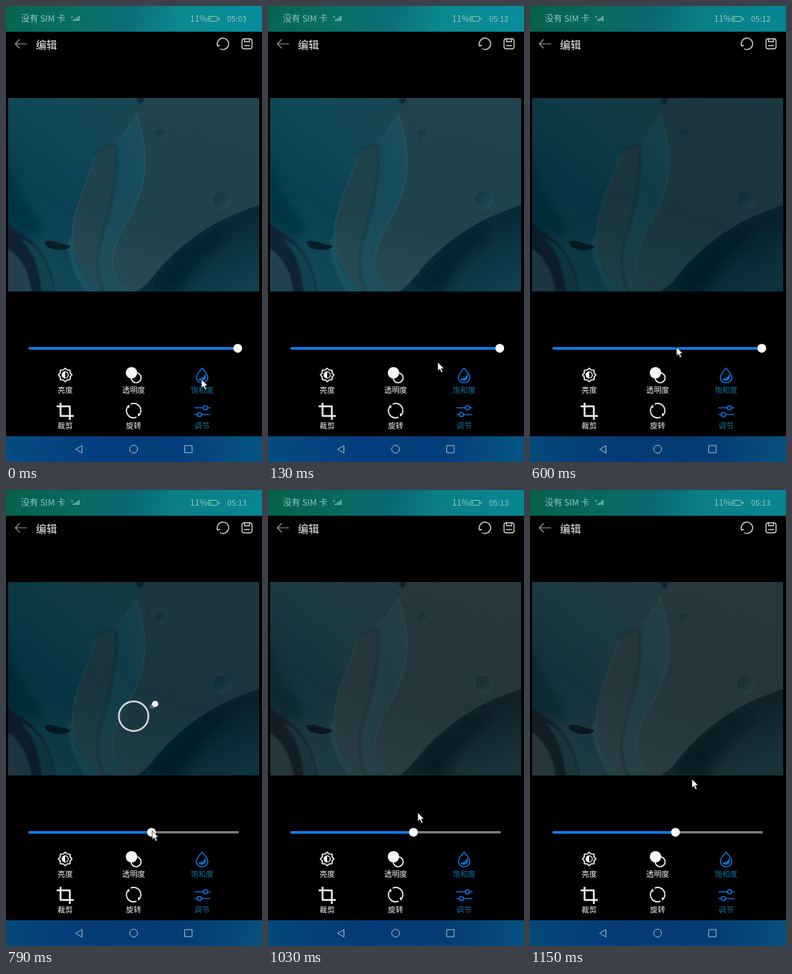
These frames come from a looping animation (359x639 px, 1270 ms). An HTML page:

```html
<!DOCTYPE html>
<html lang="zh-CN">
<head>
<meta charset="utf-8">
<title>编辑</title>
<style>
  html, body { margin: 0; width: 100%; height: 100%; overflow: hidden; background: #000; }
  svg { display: block; width: 100%; height: 100%; }
  text { font-family: "Noto Sans CJK SC", "Noto Sans CJK", "Noto Sans", sans-serif; }
  .line { fill: none; stroke: currentColor; stroke-width: 1.7; stroke-linecap: round; stroke-linejoin: round; }
  .solid { fill: currentColor; }
  .label { fill: #f2f2f2; font-size: 10.7px; text-anchor: middle; }
  .active .label { fill: #1274a4; }
  .tool { color: #f4f4f4; }
  .active { color: #0b6fd0; }

  .step { animation: 1270ms step-end infinite; }
  #cursor { animation-name: point; }
  #photo { animation-name: saturation; }
  #bars { animation-name: tint; }
  #thumb { animation-name: slide; }
  #fill { animation-name: shrink; transform-origin: 33px 480px; }
  #loader { animation-name: load; }
  #clockA { animation-name: clock-a; }
  #clockB { animation-name: clock-b; }
  #clockC { animation-name: clock-c; }

  @keyframes point {
    0% { transform: translate(274px, 523px); }
    10.236% { transform: translate(238px, 499px); }
    21.26% { transform: translate(206px, 479px); }
    47.244% { transform: translate(205.4px, 478px); }
    62.205% { transform: translate(205px, 477.5px); }
    72.441% { transform: translate(203px, 475.5px); }
    81.102% { transform: translate(210px, 452px); }
    90.551%, 100% { transform: translate(227px, 405px); }
  }
  @keyframes saturation {
    0% { filter: brightness(1.24); }
    21.26% { filter: none; }
    72.441%, 100% { filter: saturate(.62) brightness(1.05); }
  }
  @keyframes tint {
    0% { filter: brightness(1.06); }
    21.26%, 100% { filter: none; }
  }
  @keyframes slide {
    0% { transform: translateX(325px); }
    62.205%, 100% { transform: translateX(204px); }
  }
  @keyframes shrink {
    0% { transform: none; }
    62.205%, 100% { transform: scaleX(.586); }
  }
  @keyframes load {
    0%, 72.441%, 100% { visibility: hidden; }
    62.205% { visibility: visible; }
  }
  @keyframes clock-a {
    0% { visibility: visible; }
    10.236%, 100% { visibility: hidden; }
  }
  @keyframes clock-b {
    0%, 62.205%, 100% { visibility: hidden; }
    10.236% { visibility: visible; }
  }
  @keyframes clock-c {
    0% { visibility: hidden; }
    62.205%, 100% { visibility: visible; }
  }
</style>
</head>
<body>
<svg viewBox="0 0 359 639" preserveAspectRatio="none">
  <defs>
    <linearGradient id="status" gradientUnits="userSpaceOnUse" x1="0" y1="0" x2="345" y2="90"><stop stop-color="#07604c"/><stop offset=".3" stop-color="#086a60"/><stop offset=".48" stop-color="#0a6874"/><stop offset=".65" stop-color="#0a7f86"/><stop offset="1" stop-color="#078694"/></linearGradient>
    <linearGradient id="nav"><stop stop-color="#04487a"/><stop offset=".35" stop-color="#053a78"/><stop offset=".7" stop-color="#053c74"/><stop offset="1" stop-color="#06507e"/></linearGradient>
    <linearGradient id="sky" x1=".8" y1="0" x2=".4" y2="1"><stop stop-color="#1c373f"/><stop offset=".6" stop-color="#1a353d"/><stop offset="1" stop-color="#1f3c45"/></linearGradient>
    <linearGradient id="body" x1=".8" y1="0" x2=".25" y2="1"><stop stop-color="#133942"/><stop offset=".3" stop-color="#0e3a46"/><stop offset=".6" stop-color="#073443"/><stop offset="1" stop-color="#113c48"/></linearGradient>
    <linearGradient id="ribbon" x1=".8" y1="0" x2=".2" y2="1"><stop stop-color="#17404a"/><stop offset=".45" stop-color="#103c49"/><stop offset="1" stop-color="#1a404a"/></linearGradient>
    <linearGradient id="hill" x1=".2" y1=".1" x2=".8" y2="1"><stop stop-color="#0a2430"/><stop offset=".4" stop-color="#07212d"/><stop offset=".65" stop-color="#092a36"/><stop offset="1" stop-color="#0d333f"/></linearGradient>
    <linearGradient id="bubble" x2=".8" y2="1"><stop stop-color="#0f2b34"/><stop offset=".6" stop-color="#14343d"/><stop offset="1" stop-color="#1c3f48"/></linearGradient>
    <linearGradient id="tail" x1="1" y1="0" x2="0" y2="1"><stop stop-color="#fff" stop-opacity=".75"/><stop offset="1" stop-color="#fff" stop-opacity="0"/></linearGradient>
    <filter id="soft" x="-40%" y="-40%" width="180%" height="180%"><feGaussianBlur stdDeviation="7"/></filter>
    <filter id="fine"><feGaussianBlur stdDeviation="1.5"/></filter>
    <clipPath id="frame"><path d="M3 129.5H355V400H3Z"/></clipPath>
    <clipPath id="bodyClip"><path id="bodyShape" d="M3 129H194C192 140 181 148 173 165C163 188 149 194 137 198C125 204 124 218 114 243C103 270 93 298 93 319C93 351 111 383 134 401H3Z"/></clipPath>
    <clipPath id="hillClip"><path id="hillShape" d="M180 401C199 393 207 375 226 356C263 318 306 294 356 278V401Z"/></clipPath>
  </defs>

  <rect width="359" height="639"/>
  <g id="bars" class="step">
    <rect width="359" height="36" fill="url(#status)"/>
    <rect y="603" width="359" height="36" fill="url(#nav)"/>
  </g>

  <!-- Status bar -->
  <g fill="#93c4bf" color="#93c4bf">
    <text x="21" y="22" font-size="12.1" font-weight="500">没有 SIM 卡</text>
    <path d="M91 14l3 3m0-3l-3 3" stroke="currentColor" stroke-width=".8"/>
    <path d="M94 19h1.5v2H94zM96.5 17.5H98V21h-1.5zM99 16h1.5v5H99zM101.5 14H103v7h-1.5z"/>
    <text x="258" y="22" font-size="12" font-weight="500">11%</text>
    <rect class="line" style="stroke-width:1" x="283.500" y="14.500" width="13" height="7" rx="1.500"/>
    <path d="M298 16.500h1.500v3H298z"/>
    <path d="M285 16h2.500v4h-2.500z" fill="#2cd064"/>
    <g font-size="11">
      <text id="clockA" class="step" x="310" y="21.500">05:03</text>
      <text id="clockB" class="step" x="310" y="21.500">05:12</text>
      <text id="clockC" class="step" x="310" y="21.500">05:13</text>
    </g>
  </g>

  <!-- Title bar -->
  <path class="line" color="#a0a0a0" style="stroke-width:1.1" d="M29 53H13m6-6l-6 6l6 6"/>
  <text x="42" y="60" font-size="14.700" font-weight="500" fill="#f4f4f4">编辑</text>
  <g color="#d0d0d0">
    <path class="line" style="stroke-width:1.400" d="M297 56.300A8 8 0 1 1 300.500 60M295.800 53.800l1.200 2.500l2.500-1.200"/>
    <rect class="line" style="stroke-width:1.400" x="331" y="46" width="14" height="14" rx="3"/>
    <path class="line" style="stroke-width:1.300" d="M334.500 46v4h7v-4M334.500 55.500h7"/>
  </g>

  <!-- Picture -->
  <g id="photo" class="step">
    <g clip-path="url(#frame)">
      <rect x="3" y="129" width="353" height="272" fill="url(#sky)"/>
      <path d="M194 129C180 144 179 160 168 173C158 188 153 194 155 215C157 250 146 288 134 326C126 350 127 379 138 401H176C155 388 146 374 150 350C156 315 180 292 190 255C200 218 194 185 182 150Z" fill="url(#ribbon)"/>
      <path d="M154 196C158 240 147 286 134 326C126 350 127 379 138 401" fill="none" stroke="#0d2a34" stroke-width="1.800" filter="url(#fine)"/>
      <path d="M182 150C194 185 200 218 190 255C180 292 156 315 150 350C146 374 155 388 176 401" fill="none" stroke="#2b4d56" stroke-width=".8"/>
      <use href="#bodyShape" fill="url(#body)"/>
      <g clip-path="url(#bodyClip)">
        <path d="M-10 190C10 240 25 270 52 306L48 326C25 322 10 312 -10 300Z" fill="#042a38" filter="url(#soft)"/>
        <path d="M-2 300C18 318 34 322 48 344C62 364 66 386 70 408H34C30 370 18 350 -2 340Z" fill="#081f2a" filter="url(#fine)"/>
        <path d="M3 340C20 352 32 372 36 401H3Z" fill="#1a363f" filter="url(#fine)"/>
        <path d="M20 326C44 332 62 362 68 401H50C46 364 38 344 20 326Z" fill="#0e3541" filter="url(#fine)"/>
        <path d="M95 320C90 350 105 380 134 403H112C99 380 85 353 87 328Z" fill="#17424d" filter="url(#fine)"/>
        <path d="M54 331C62 325 75 334 91 336C88 342 77 343 67 341C61 340 56 337 54 331Z" fill="#051820"/>
        <path d="M184 129H196L190 138Q184 136 184 129Z" fill="#071c25" filter="url(#fine)"/>
      </g>
      <path d="M173 165C163 188 149 194 137 198C125 204 124 218 114 243C103 270 93 298 93 319C93 351 111 383 134 401" fill="none" stroke="#284b54" stroke-width=".8"/>
      <path d="M126 208C129 198 143 198 151 193" fill="none" stroke="#0a2630" stroke-width="1.600" filter="url(#fine)"/>
      <use href="#hillShape" fill="url(#hill)"/>
      <g clip-path="url(#hillClip)">
        <path d="M196 397C222 362 250 338 300 310L308 322C280 345 260 372 244 404Z" fill="#061c28" filter="url(#soft)"/>
      </g>
      <path d="M180 401C199 393 207 375 226 356C263 318 306 294 356 278" fill="none" stroke="#203e47" stroke-width=".8"/>
      <circle cx="217" cy="180" r="7.500" fill="url(#bubble)"/>
      <circle cx="302" cy="272" r="12.500" fill="url(#bubble)" stroke="#25464f" stroke-width=".6"/>
      <path d="M197 171.500q3-2 5 0" fill="none" stroke="#0d2933" stroke-width="1.200"/>
    </g>
  </g>

  <g id="loader" class="step">
    <circle cx="179" cy="317" r="20.700" fill="none" stroke="#d3d8da" stroke-width="2.500"/>
    <path d="M206 297L200 305Q203 309 208 305L212 302Z" fill="url(#tail)"/>
    <circle cx="209.300" cy="299.700" r="4.300" fill="#fff"/>
  </g>

  <!-- Slider -->
  <path d="M33 479.700H325" stroke="#808080" stroke-width="3.200" stroke-linecap="round"/>
  <rect id="fill" class="step" x="32" y="478" width="293" height="3.400" rx="1.700" fill="#0a7dff"/>
  <circle id="thumb" class="step" cy="479.700" r="6.200" fill="#fff"/>

  <!-- Tools -->
  <g class="tool" transform="translate(83 517)">
    <path class="line" d="M0-9.500L2.700-7L6.700-6.700L7-2.700L9.500 0L7 2.700L6.700 6.700L2.700 7L0 9.500L-2.700 7L-6.700 6.700L-7 2.700L-9.500 0L-7-2.700L-6.700-6.700L-2.700-7Z"/>
    <circle class="line" r="4.400" style="stroke-width:1.300"/>
    <path class="solid" d="M0-4.500A4.500 4.500 0 0 0 0 4.500Z"/>
    <text class="label" y="25">亮度</text>
  </g>
  <g class="tool" transform="translate(179 517)">
    <circle class="line" cx="3.500" cy="4" r="7"/>
    <circle class="solid" cx="-3" cy="-3" r="8"/>
    <text class="label" y="25">透明度</text>
  </g>
  <g class="tool active" transform="translate(275 517)">
    <path class="line" d="M0-9.500C4-5 8-1 8 3.500A8 7.500 0 0 1-8 3.500C-8-1-4-5 0-9.500Z"/>
    <path class="solid" d="M4.500-2C7 4 4 8-1 8.300C-4 8-5 6-4.500 5C0 5 3 3 4.500-2Z"/>
    <text class="label" y="25">饱和度</text>
  </g>
  <g class="tool" transform="translate(83 567)">
    <path class="line" style="stroke-width:2.400;stroke-linecap:butt" d="M-6.500-11V7.500H12M-12-6H6.500V13"/>
    <text class="label" y="25">裁剪</text>
  </g>
  <g class="tool" transform="translate(179 567)">
    <path class="line" d="M-3.500-9.400A10 10 0 0 1 7 7.200l-.2-2.600M3.500 9.400A10 10 0 0 1-7-7.200l.2 2.600"/>
    <text class="label" y="25">旋转</text>
  </g>
  <g class="tool active" transform="translate(275 567)">
    <path class="line" d="M-10-4H1.500M8-4H11M-10 5.500H-7M-.500 5.500H11"/>
    <circle class="line" cx="4.700" cy="-4" r="3"/>
    <circle class="line" cx="-3.800" cy="5.500" r="3"/>
    <text class="label" y="25">调节</text>
  </g>

  <!-- Navigation -->
  <g class="line" color="#a9bfd0" style="stroke-width:1">
    <path d="M98 621L106.500 616V626Z"/>
    <circle cx="179" cy="621" r="5.500"/>
    <rect x="251" y="616" width="10" height="10"/>
  </g>

  <g id="cursor" class="step">
    <path d="M0 0V12.500L2.900 9.800L5 14.700L7.200 13.800L5.100 9H9Z" fill="#fff" stroke="#000" stroke-width=".7"/>
  </g>
</svg>
</body>
</html>
```
